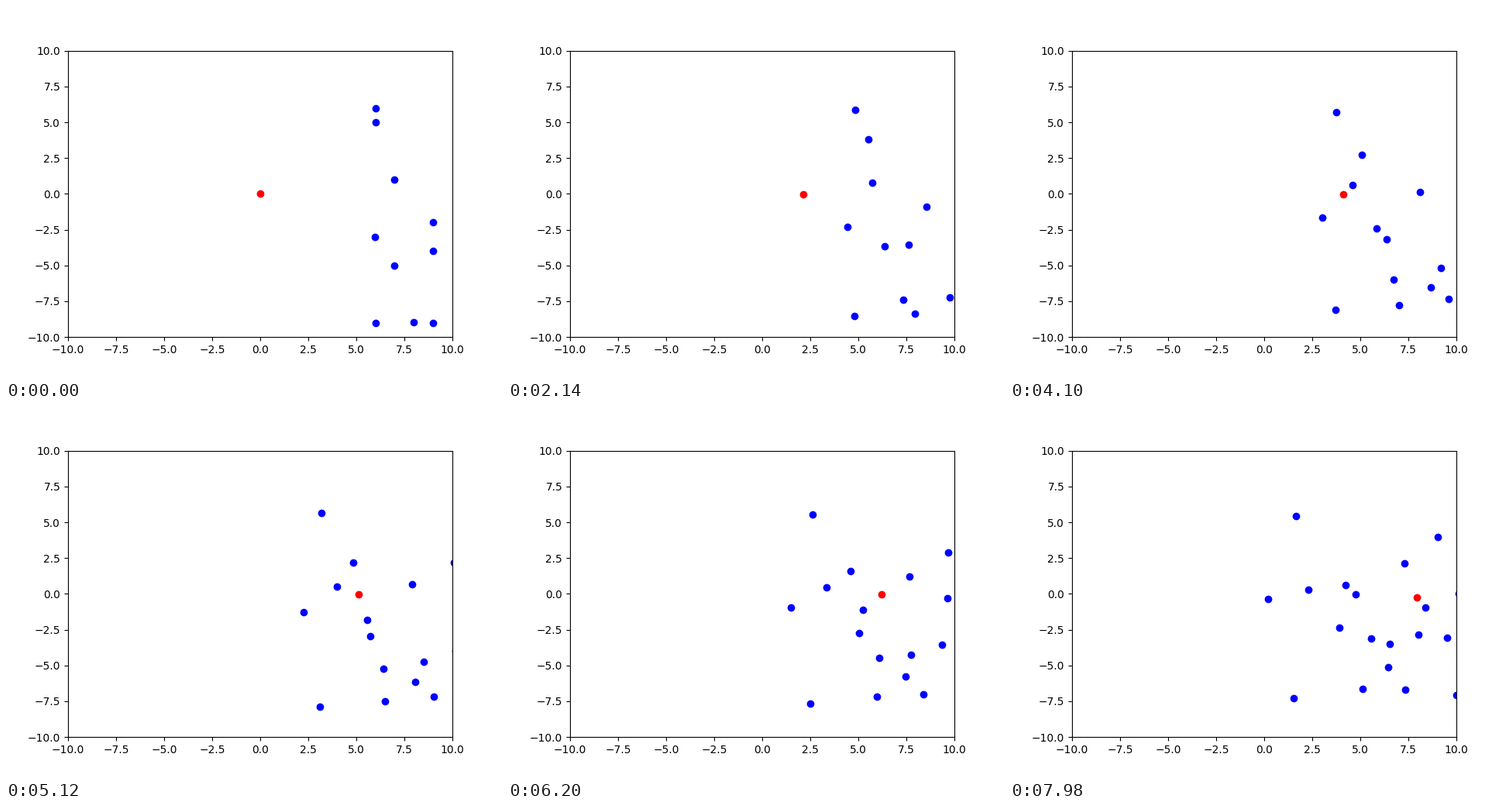
Recreate the animation shown at these times as a matplotlib script. Size 640 by 480 pixels, loop 8 s.

```python
import numpy as np
import matplotlib.pyplot as plt
from matplotlib.animation import FuncAnimation

FRAMES = 400
INTERVAL = 20
SPEED = 0.02        # red dot, units per frame
SWERVE_START = 340  # frame at which the red dot begins to turn away
SWERVE_DROP = 0.22
SWERVE_LAG = 0.027

# Start x, start y, and the way covered in FRAMES steps
DOTS = np.array([
    (6, 6, -4.357, -0.571),
    (6, 5, -1.782, -4.383),
    (7, 1, -4.694, -0.728),
    (9, -2, -1.710, 4.134),
    (6, -3, -5.806, 2.652),
    (9, -4, -5.093, 1.634),
    (7, -5, -2.262, 4.984),
    (6, -9, -4.480, 1.726),
    (8, -9, -2.448, 5.860),
    (9, -9, -3.883, 2.359),
    (11, -8, -4.552, 2.879),
    (12, -7, -5.460, 3.512),
    (12, -8, -4.649, 1.293),
    (12, -1, -2.976, 4.984),
    (14, -6, -5.976, 3.155),
    (14, 2, -5.613, -2.949),
    (15, -6, -5.484, 2.937),
    (15, -2, -4.880, 2.020),
    (15, -9, -5.000, 1.930),
])
START, TRAVEL = DOTS[:, :2], DOTS[:, 2:]


def dot_places(n):
    return START + TRAVEL * (n + 1) / FRAMES


def red_place(n):
    turn = max(0, n - SWERVE_START) / (FRAMES - 1 - SWERVE_START)
    x = SPEED * n - SWERVE_LAG * turn ** 3
    y = -0.02 * min(1, n / 30) - SWERVE_DROP * turn ** 2
    return x, y


fig, ax = plt.subplots(figsize=(6.4, 4.8), dpi=100)
ax.set_xlim(-10, 10)
ax.set_ylim(-10, 10)
blue, = ax.plot([], [], "o", color="blue")
red, = ax.plot([], [], "o", color="red")


def draw(n):
    blue.set_data(*dot_places(n).T)
    x, y = red_place(n)
    red.set_data([x], [y])
    return blue, red


anim = FuncAnimation(fig, draw, frames=FRAMES, interval=INTERVAL,
                     init_func=lambda: draw(0), repeat=True, repeat_delay=0)
plt.show()
```
